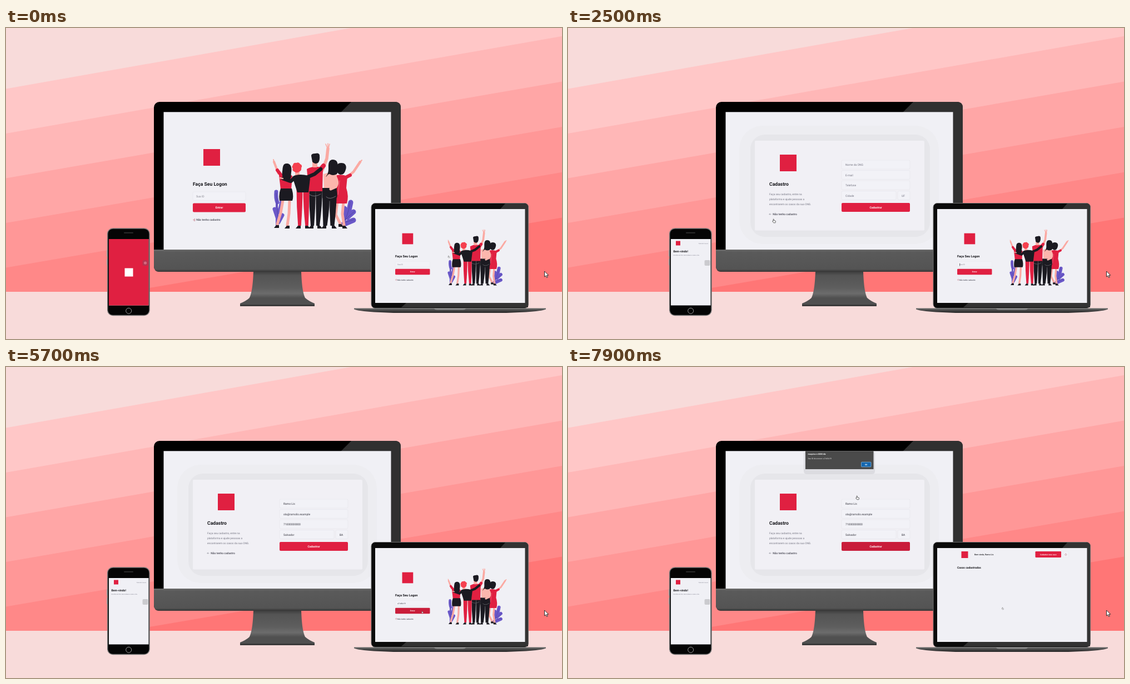
Animation, 1000 px wide and 560 px high, one loop 8 s. Source, as an HTML page:

```html
<!DOCTYPE html>
<html lang="pt">
<head>
<meta charset="utf-8">
<title>Login em três telas</title>
<style>
html, body { margin: 0; width: 1000px; height: 560px; overflow: hidden; background: #f8dbda; }
svg { display: block; font-family: Roboto, "Liberation Sans", sans-serif; text-rendering: geometricPrecision; }
</style>
</head>
<body>
<svg id="stage" width="1000" height="560" viewBox="0 0 1000 560">
  <defs>
    <linearGradient id="chin" x2="0" y2="1">
      <stop stop-color="#6c6c6c"/><stop offset=".1" stop-color="#5a5a5a"/>
      <stop offset=".88" stop-color="#545454"/><stop offset="1" stop-color="#343434"/>
    </linearGradient>
    <linearGradient id="stand" x2="0" y2="1">
      <stop stop-color="#3c3c3c"/><stop offset=".15" stop-color="#545454"/>
      <stop offset=".6" stop-color="#5e5e5e"/><stop offset=".8" stop-color="#6c6c6c"/>
      <stop offset="1" stop-color="#4a4a4a"/>
    </linearGradient>
    <linearGradient id="base" x2="0" y2="1">
      <stop stop-color="#777"/><stop offset=".4" stop-color="#4a4a4a"/><stop offset="1" stop-color="#262626"/>
    </linearGradient>
  </defs>
</svg>
<script>
const RED = '#e02041', DARK_RED = '#c91d3a', INK = '#15151a', BLACK = '#1b1a21',
      SKIN = '#fba9a2', BLUSH = '#fcb6ad', PAGE = '#f0f0f5', PURPLE = '#6a58c8', GREY = '#737380';
const LOOP = 8000, STEP = 100;
const ORG = 'Ramo Lis', ACCESS_ID = 'a7c40e19';

// Drawing helpers
const rect = (x, y, w, h, fill, r = 0, more = '') =>
  `<rect x="${x}" y="${y}" width="${w}" height="${h}" rx="${r}" fill="${fill}" ${more}/>`;
const shape = (fill, d, more = '') => `<path fill="${fill}" d="${d}" ${more}/>`;
const line = (color, width, d, more = '') =>
  `<path fill="none" stroke="${color}" stroke-width="${width}" stroke-linecap="round" stroke-linejoin="round" d="${d}" ${more}/>`;
const text = (x, y, size, str, fill = INK, more = '') =>
  `<text x="${x}" y="${y}" font-size="${size}" fill="${fill}" ${more}>${str}</text>`;
const bold = (x, y, size, str, fill = INK, more = '') =>
  text(x, y, size, str, fill, 'font-weight="700" ' + more);
const mid = 'text-anchor="middle"';
const group = (id, content, more = '') => `<g id="${id}" ${more}>${content}</g>`;
const mark = (cx, cy, size, fill = RED) => rect(cx - size / 2, cy - size / 2, size, size, fill);

const arrow = scale => `<path transform="scale(${scale})" fill="#fff" stroke="#222" stroke-width="1"
  d="M0 0V10.5L2.5 8.3 4.2 12 6 11.2 4.3 7.6H7.6z"/>`;
const hand = scale => `<path transform="scale(${scale})" fill="#fff" stroke="#222" stroke-width="1.3"
  d="M0 1Q1.5-1 2.5 1V5L8 6.5Q9 7 8.5 10L7.5 13H1.5L-2.5 8Q-2.5 6 0 7.5z"/>`;

function background() {
  const tones = ['#ffc7c7', '#ffb7b7', '#ffa6a6', '#ff9797', '#ff8888', '#ff7676'];
  return rect(0, 0, 1000, 560, '#f8dbda') +
    tones.map((c, i) => shape(c, `M0 ${109.5 + 80.5 * i}L1000 ${81.7 * i - 67}V475H0z`)).join('') +
    rect(0, 475, 1000, 85, '#f8dbda');
}

function people() {
  const shoe = (x, y, dir = 1) => shape(BLACK, `M${x - 3 * dir} ${y - 5}h${5 * dir}l${4 * dir} 5h${-9 * dir}z`);
  // Tapered trouser leg from the hip down to the ankle
  const leg = (color, hip, foot, w, bottom = 356) =>
    shape(color, `M${hip - w / 2} 288h${w}Q${hip + w / 2} 318 ${foot + w / 4} ${bottom}h${-w / 2}Q${hip - w / 2} 322 ${hip - w / 2} 288z`);
  return [
    // plants
    line(PURPLE, 7, 'M486 295Q485 306 488 314M496 310Q495 322 490 332M483 326L489 344M497 337L490 350'),
    line(PURPLE, 4, 'M487 304V356'),
    line(PURPLE, 9, 'M620 314L617 328M625 331L614 341M625 346L611 352M609 325L611 340'),
    line(PURPLE, 4, 'M619 320Q614 344 602 355'),
    line('#453a91', .6, 'M486 297L490 355M603 355Q616 340 619 313M609 346L627 330M606 351L626 345'),
    // woman in the red dress
    line(SKIN, 4.5, 'M613 269L625 259 637 241'), line(SKIN, 2, 'M637 241l3-3'),
    line(SKIN, 5, 'M596 312L593 336 602 354M607 312L605 335 608 355'),
    shoe(601, 358), shoe(608, 361),
    line(RED, 6, 'M611 269l8-4'),
    shape(RED, 'M591 266q12-4 23 1l-2 21q5 15 1 28h-23q-4-14 0-28z'),
    shape(BLACK, 'M603 243c8 0 10 6 8 12s-4 9-9 9-8-6-8-11 2-10 9-10z'),
    // woman with long hair
    leg(BLACK, 576, 574, 14), leg(BLACK, 588, 587, 14),
    shoe(573, 361, -1), shoe(589, 361),
    shape(BLUSH, 'M571 263q12-5 24 0l-1 27h-22z'),
    shape(BLACK, 'M570 288h24q3 12 1 18h-26z'),
    line(BLUSH, 5, 'M591 266Q599 278 593 286L584 290'),
    shape(BLACK, 'M588 237c9 0 9 9 9 14s1 8-2 12q-7 4-13 0c-4 0-4 4-7 5q5-6 5-14c0-7-1-17 8-17z'),
    // man
    line(SKIN, 5.5, 'M579 217L577 235 569 256'),
    line(SKIN, 1.6, 'M578 216L575 209M579 215V208M580 216L582 209'),
    leg(BLACK, 551, 551, 12), leg(BLACK, 563, 561, 12),
    shoe(550, 361, -1), shoe(563, 361),
    line(RED, 8, 'M565 255l6-7'),
    shape(RED, 'M541 254q14-8 29-2l-1 42h-24z'),
    rect(551, 239, 9, 12, SKIN, 2),
    shape(BLACK, 'M549 230q0-4 7-4q7-2 8 3q1 10-3 14q-6 3-10-2z'),
    // woman with the raised left arm
    line(SKIN, 4, 'M482 241L490 262'), line(SKIN, 2, 'M482 241l-1-4'),
    line(SKIN, 5, 'M498 310L494 333 488 353M510 310L509 334 506 355'),
    shoe(488, 360, -1), shoe(507, 361, -1),
    line(RED, 6, 'M488 256L497 268'),
    shape(RED, 'M491 265q12-4 24 1l-2 25h-19z'),
    shape(BLACK, 'M494 289h20q4 14 1 22h-23q-2-12 2-22z'),
    // curly red hair
    leg(RED, 528, 528, 11), leg(RED, 540, 541, 11),
    shoe(527, 361, -1), shoe(541, 361),
    rect(520, 255, 8, 11, SKIN, 2),
    shape(BLACK, 'M515 268q10-7 29-2l3 5-3 25h-20z'),
    line(BLACK, 6.5, 'M541 269L555 263 566 254M520 269L512 276 498 271'),
    line(SKIN, 2.5, 'M498 271l-5-1'),
    shape('#f5404f', 'M516 247q1-5 6-4q5-2 7 2q5 2 2 7q1 5-4 7q-4 3-8 0q-5-2-3-6q-3-3 0-6z'),
    shape(BLACK, 'M505 244c9 0 9 10 8 16s1 8-2 12q-6 2-11 0c-3-4-4-8-3-14s0-14 8-14z'),
    line('#f2f0f4', .4, 'M546 300Q555 306 566 299M576 304Q582 310 593 303M557 305V340M582 312V340M600 275L597 300')
  ].join('');
}

// Logon page; each screen names its own input and button
const login = name => [
  mark(370, 233, 30),
  bold(336, 284, 8.65, 'Faça Seu Logon'),
  rect(336, 295, 95, 15.5, '#f2f2f7', 2, 'stroke="#e2e2e8" stroke-width=".5"'),
  text(342, 304.7, 5.1, 'Sua ID', '#85858f', `id="${name}Id"`),
  rect(336, 315.5, 95, 16, RED, 2, `id="${name}Button"`),
  bold(383.5, 325.3, 5, 'Entrar', '#fff', mid),
  line('#b5505f', .45, 'M336.4 345.6h2.4M337.8 344.4l1.2 1.2-1.2 1.2M338.6 343.6h1.2v4h-1.2'),
  text(342.2, 347.3, 4.95, 'Não tenho cadastro', '#41414d', 'font-weight="500"'),
  people()
].join('');

function signup() {
  const fields = [
    ['Nome da ONG', ORG], ['E-mail', 'ola@ramolis.example'],
    ['Telefone', '71000000000'], ['Cidade', 'Salvador'], ['UF', 'BA']
  ];
  const field = ([hint, value], i) => {
    const x = i < 4 ? 492 : 593, y = 238 + 18.5 * Math.min(i, 3), w = [123, 123, 123, 98, 22][i];
    return rect(x, y, w, 16, '#f2f2f7', 2, 'stroke="#e0e0e7" stroke-width=".5"') +
      text(x + 7, y + 10, 5, hint, GREY, `id="hint${i}"`) +
      text(x + 7, y + 10, 5, value, '#33333d', `id="value${i}"`);
  };
  const lines = ['Faça seu cadastro, entre na', 'plataforma e ajude pessoas a', 'encontrarem os casos da sua ONG.'];
  return rect(308, 176, 359, 213, '#ededf1', 42) + rect(328, 192, 323, 184, '#e6e6ea', 26) +
    rect(336, 203, 305, 161.5, '#f1f0f5', 2) +
    mark(396, 243, 30) + bold(362, 284.3, 8.65, 'Cadastro') +
    lines.map((s, i) => text(362, 301.3 + 8.8 * i, 4.8, s, GREY)).join('') +
    line(GREY, .5, 'M362 335.3h3.2M363.3 334l-1.3 1.3 1.3 1.3') +
    text(368.3, 337.2, 4.95, 'Não tenho cadastro', '#41414d', 'font-weight="500"') +
    fields.map(field).join('') +
    rect(492, 315, 123, 16, RED, 2, 'id="signButton"') +
    bold(553.5, 324.8, 5, 'Cadastrar', '#fff', mid);
}

const alertBox = () =>
  rect(424, 152, 128, 41, '#d3d3d8', 5, 'opacity=".6"') + rect(427, 151.3, 122.5, 32.7, '#4a4a4a') +
  bold(431.5, 158.3, 3.6, 'maquina-x:0000 diz', '#fff') +
  text(431.5, 165.8, 3.4, 'Seu ID de acesso: ' + ACCESS_ID, '#eee') +
  rect(527.5, 171.2, 17.5, 8.6, '#1466ae', 1, 'stroke="#8fc3ee" stroke-width=".7"') +
  bold(536.2, 176.8, 3.4, 'OK', '#fff', mid);

const monitor = () =>
  shape('url(#stand)', 'M445 438H531C532 464 534 478 539 488H437C442 478 444 464 445 438z') +
  shape('#505050', 'M438 486H538Q545 492 555 496V501H421V496Q431 492 438 486z') +
  rect(421, 498, 134, 3, '#3a3a3a', 1) +
  rect(266, 133, 444, 306, '#000', 10) +
  shape('#303030', 'M621 133H700Q710 133 710 143V399H692V152H602z') +
  shape('url(#chin)', 'M266 399H710V429Q710 439 700 439H276Q266 439 266 429z') +
  rect(283.5, 151.3, 409, 247.7, PAGE) +
  group('deskLogin', login('desk')) + group('signup', signup()) + group('alert', alertBox()) +
  group('deskArrow', arrow(.5)) + group('deskHand', hand(.52));

const dashboard = () =>
  mark(713.5, 338, 12) +
  text(731, 339.3, 3.7, `Bem vinda, ${ORG}`, INK, 'font-weight="500"') +
  rect(840.5, 332, 46.5, 11, RED, 1.3) + bold(863.8, 338.8, 3.2, 'Cadastrar novo caso', '#fff', mid) +
  rect(890, 332, 10.5, 11, '#f2f2f7', 1.3, 'stroke="#e4e4ea" stroke-width=".4"') +
  line('#b06a78', .5, 'M894.3 336.6a1.6 1.6 0 1 0 2 0M895.3 335.8v1.5') +
  bold(700, 362.6, 5, 'Casos cadastrados');

const laptop = () =>
  rect(657, 315.5, 282.5, 189, '#0b0b0b', 7, 'stroke="#6e6e6e" stroke-width="1"') +
  shape('#333', 'M898 316H932Q939 316 939 323V503H711L720 495H930V326H889z') +
  rect(664, 326, 269.5, 169, PAGE) +
  group('lapLogin', login('lap'), 'transform="translate(479.3 226.4) scale(.657)"') +
  line('#222', .6, 'M704.6 424.2v4', 'id="caret"') +
  group('dashboard', dashboard()) +
  shape('url(#base)', 'M626 504.5H971V506.5Q962 510 935 511.5L900 513H697L662 511.5Q635 510 626 506.5z') +
  shape('#8a8a8a', 'M770 505H827Q826 507.5 822 507.5H775Q771 507.5 770 505z') +
  group('lapCursor', hand(.28));

const phone = () =>
  rect(181, 400, 2, 11, '#aaa') + rect(181, 416, 2, 11, '#aaa') +
  rect(182.7, 361, 75.3, 156.5, '#050505', 9.5, 'stroke="#777" stroke-width="1.4"') +
  rect(212, 367.8, 17, 2, '#2d2d2d', 1) +
  '<circle cx="220.7" cy="509.3" r="5" fill="#050505" stroke="#aaa" stroke-width=".9"/>' +
  rect(185, 380, 71.5, 119.5, PAGE) +
  group('splash', rect(185, 380, 71.5, 119.5, RED) + mark(221, 440, 15, '#fff') +
    rect(245.5, 418, 10, 10, '#b83450', 2.5) +
    '<circle cx="250.5" cy="423" r="2.6" fill="#d56a80"/>') +
  group('home', mark(198, 387.5, 8) +
    text(252, 388.6, 2.4, 'Total de 0 casos', GREY, 'text-anchor="end"') +
    bold(189.5, 403.6, 5.1, 'Bem-vindo!') +
    text(189.5, 410, 2.45, 'Escolha um dos casos abaixo e salve o dia.', GREY) +
    rect(245.5, 418, 10, 10, '#cbcbcf', 2));

document.getElementById('stage').insertAdjacentHTML('beforeend',
  background() + monitor() + laptop() + phone() +
  `<g transform="translate(968.5 438)">${arrow(.95)}</g>`);

// Pointer paths: [time, x, y]
const deskPath = [
  [500, 510, 250], [1000, 439, 327], [1500, 439, 327], [1900, 369, 344], [2700, 369, 344],
  [3200, 425, 337], [6000, 495, 266], [6400, 528, 327], [7400, 528, 327], [7600, 520, 258],
  [7800, 520, 258], [7900, 519, 232]
];
const lapPath = [
  [500, 795.5, 410], [1000, 712, 424], [4100, 858, 381], [4500, 748, 439.5], [6000, 748, 439.5],
  [6400, 766.5, 440.5], [7800, 766.5, 440.5], [7900, 781, 433]
];
function along(path, t) {
  const i = path.findIndex(k => k[0] > t);
  if (i === 0) return path[0].slice(1);
  if (i < 0) return path[path.length - 1].slice(1);
  const [t0, x0, y0] = path[i - 1], [t1, x1, y1] = path[i], p = (t - t0) / (t1 - t0);
  return [x0 + (x1 - x0) * p, y0 + (y1 - y0) * p];
}

const el = id => document.getElementById(id);
const show = (id, on) => { el(id).style.display = on ? '' : 'none'; };
const place = (id, pos) => el(id).setAttribute('transform', `translate(${pos})`);
const paint = (id, color) => el(id).setAttribute('fill', color);
const fillTimes = [4700, 4800, 4900, 5400, 5500];

function draw(t) {
  show('splash', t < 1700);
  show('home', t >= 1700);

  show('deskLogin', t < 2500);
  show('signup', t >= 2500);
  fillTimes.forEach((at, i) => {
    show('hint' + i, t < at);
    show('value' + i, t >= at);
  });
  paint('signButton', t >= 6400 ? DARK_RED : RED);
  show('alert', t >= 7100);

  const pos = along(deskPath, t), onDesk = t >= 500 && (t < 4700 || t >= 6100);
  place('deskArrow', pos);
  place('deskHand', pos);
  show('deskArrow', onDesk && t < 1800);
  show('deskHand', onDesk && t >= 1800);

  const typed = Math.max(0, Math.min(8, 2 * Math.floor((t - 2700) / 100)));
  el('lapId').textContent = typed ? ACCESS_ID.slice(0, typed) : 'Sua ID';
  paint('lapId', typed ? '#33333d' : '#85858f');
  paint('lapButton', t >= 4500 ? DARK_RED : RED);
  show('caret', t >= 1200 && t < 2800);
  show('lapLogin', t < 5800);
  show('dashboard', t >= 5800);
  place('lapCursor', along(lapPath, t));
  show('lapCursor', t < 1200 || t >= 4200);
}

function tick() {
  draw(Math.floor(performance.now() % LOOP / STEP) * STEP);
  requestAnimationFrame(tick);
}
tick();
</script>
</body>
</html>
```
